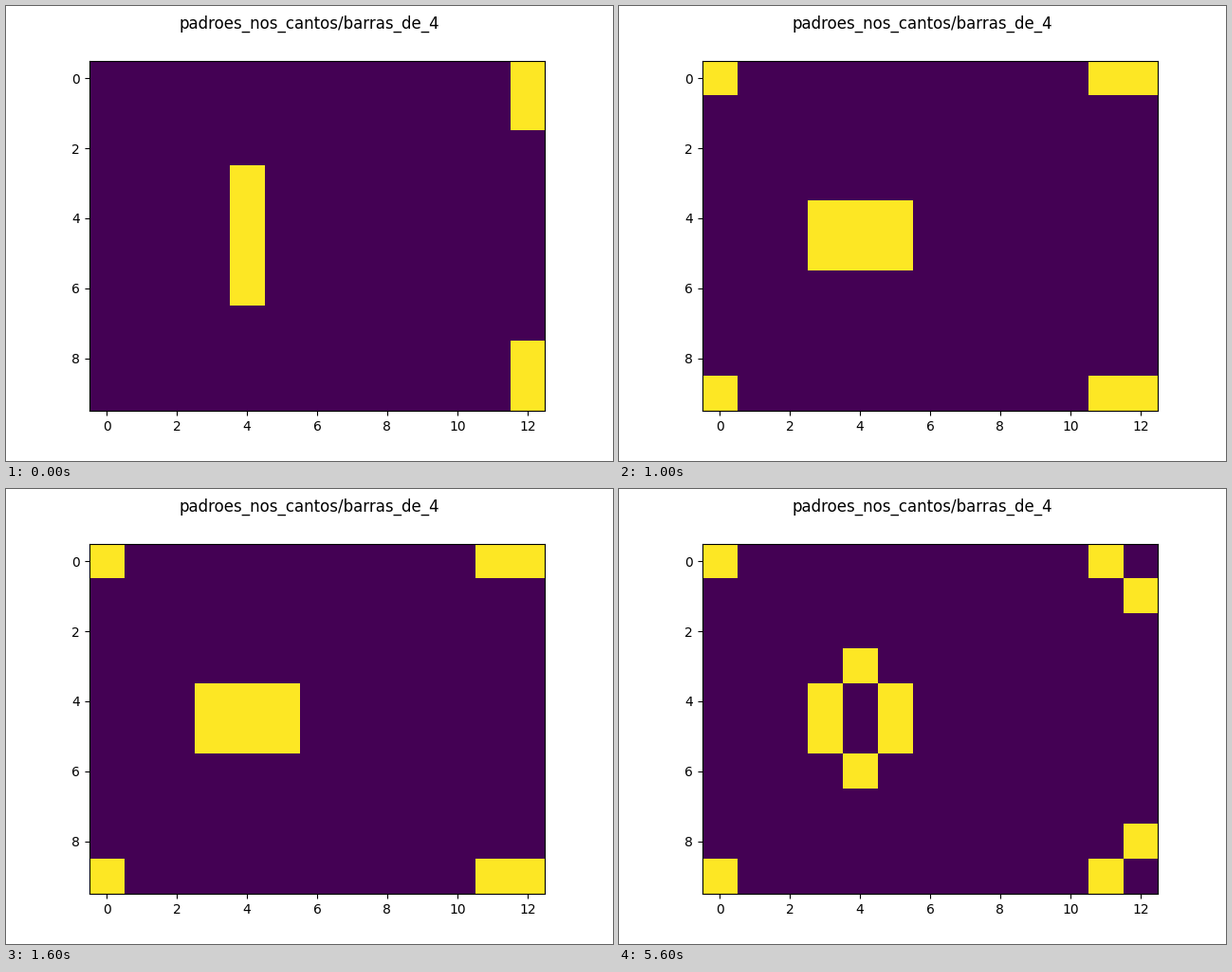
A matplotlib script that plays this animation: 640 by 480 pixels, repeating every 8 s.

```python
import matplotlib.pyplot as plt
import numpy as np
from matplotlib.animation import FuncAnimation

ROWS, COLS = 10, 13
FRAMES, INTERVAL = 8, 1000


def initial_grid():
    """Two vertical bars of four cells, one wrapping around the edge."""
    grid = np.zeros((ROWS, COLS), dtype=int)
    grid[3:7, 4] = 1
    grid[np.arange(-2, 2), -1] = 1
    return grid


def step(grid):
    """One generation of the Game of Life on a torus."""
    neighbours = sum(
        np.roll(grid, (dy, dx), axis=(0, 1))
        for dy in (-1, 0, 1)
        for dx in (-1, 0, 1)
        if (dy, dx) != (0, 0)
    )
    return ((neighbours == 3) | ((grid == 1) & (neighbours == 2))).astype(int)


def generation(n):
    grid = initial_grid()
    for _ in range(n):
        grid = step(grid)
    return grid


fig, ax = plt.subplots(figsize=(6.4, 4.8), dpi=100)
fig.suptitle("padroes_nos_cantos/barras_de_4")
image = ax.imshow(initial_grid(), cmap="viridis", vmin=0, vmax=1)


def update(frame):
    image.set_data(generation(frame))
    return [image]


anim = FuncAnimation(fig, update, frames=FRAMES, interval=INTERVAL,
                     repeat=True, repeat_delay=0, blit=False)
plt.show()
```
